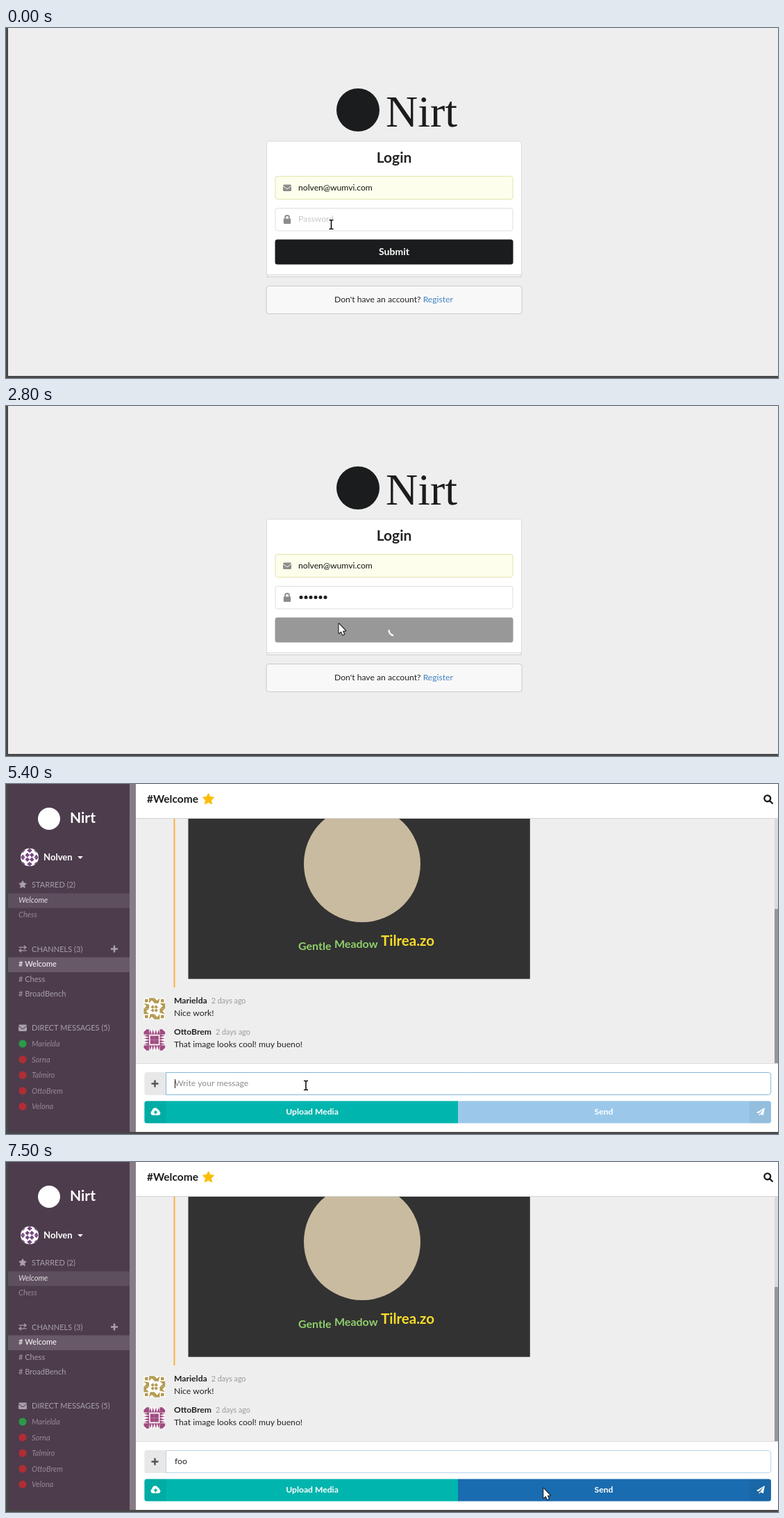
Recreate the animation shown at these times as an HTML page with a canvas. Size 1112 by 504 pixels, loop 8000 ms.

```html
<!DOCTYPE html>
<html lang="en">
<head>
<meta charset="utf-8">
<title>Chat login</title>
<style>
  html, body { margin: 0; width: 100%; height: 100%; overflow: hidden; background: #eee; }
  canvas { display: block; }
</style>
</head>
<body>
<canvas id="stage" width="1112" height="504"></canvas>
<script>
const ctx = document.getElementById('stage').getContext('2d');
const LOOP = 8000, BASE = 12.16, SIDE = 11.05;
const INK = '#1b1c1d', FOCUS = '#85b7d9', LINE = '#dededf', HINT = '#c7c7c7', HINT_ON = '#8c8c8c';

// ---- drawing helpers ----
function rect(x, y, w, h, fill) {
  ctx.fillStyle = fill;
  ctx.fillRect(x, y, w, h);
}

function box(x, y, w, h, fill, stroke, radius = 3.5) {
  ctx.beginPath();
  ctx.roundRect(x, y, w, h, radius);
  ctx.fillStyle = fill;
  ctx.fill();
  if (stroke) {
    ctx.strokeStyle = stroke;
    ctx.lineWidth = 1;
    ctx.stroke();
  }
}

function disc(x, y, r, fill) {
  ctx.beginPath();
  ctx.arc(x, y, r, 0, 2 * Math.PI);
  ctx.fillStyle = fill;
  ctx.fill();
}

// Draws text and returns its width
function text(s, x, y, size, color, style = '', align = 'left', family = 'Lato, sans-serif') {
  ctx.font = `${style} ${size}px ${family}`;
  ctx.textAlign = align;
  ctx.fillStyle = color;
  ctx.fillText(s, x, y);
  return ctx.measureText(s).width;
}

function shape(x, y, d, fill, stroke, width = 1) {
  const path = new Path2D(d);
  ctx.save();
  ctx.translate(x, y);
  ctx.lineJoin = 'round';
  if (stroke) {
    ctx.strokeStyle = stroke;
    ctx.lineWidth = width;
    ctx.stroke(path);
  }
  if (fill) {
    ctx.fillStyle = fill;
    ctx.fill(path);
  }
  ctx.restore();
}

// ---- icons ----
function star(x, y, r, color) {
  let d = '';
  for (let i = 0; i < 10; i++) {
    const a = i * Math.PI / 5 - Math.PI / 2, k = i % 2 ? r * 0.5 : r;
    d += (i ? 'L' : 'M') + Math.cos(a) * k + ' ' + Math.sin(a) * k;
  }
  shape(x, y, d + 'Z', color, color, 1);
}

function plus(x, y, color) {
  rect(x - 5, y - 1.25, 10, 2.5, color);
  rect(x - 1.25, y - 5, 2.5, 10, color);
}

function mail(x, y, color, back) {
  box(x - 6, y - 4.5, 12, 9.5, color, null, 1.5);
  shape(x, y, 'M-6 -2.5L-1 1.2Q0 1.8 1 1.2L6 -2.5', null, back, 1);
}

function lock(x, y, color) {
  box(x - 5.2, y - 1.5, 10.4, 7.5, color, null, 1.2);
  shape(x, y, 'M-3 -1V-3A3 3 0 0 1 3 -3V-1', null, color, 1.8);
}

function search(x, y) {
  shape(x, y, 'M3.2 -1.2A4.4 4.4 0 1 1 -5.6 -1.2A4.4 4.4 0 1 1 3.2 -1.2M2 2L6.5 6.5', null, INK, 2.4);
}

function cloud(x, y, color) {
  shape(x, y, 'M-4.5 5A3.5 3.5 0 0 1 -5 -1.5A4.3 4.3 0 0 1 3 -3.5A3 3 0 0 1 5.5 -0.5A3 3 0 0 1 4.5 5Z', '#fff');
  shape(x, y, 'M0 -2L3.2 1.3H1V3.6H-1V1.3H-3.2Z', color);
}

function plane(x, y) {
  shape(x, y, 'M6 -6L-6 1L-3 2.4L4 -4L-1 3.2L3.8 5.2ZM-2.2 3V6L-0.3 3.8Z', '#fff');
}

// Four-fold tile portrait: one quarter turned about the centre, in units of a half side
function tiles(cx, cy, half, color, quarter) {
  rect(cx - half, cy - half, 2 * half, 2 * half, '#fff');
  const path = new Path2D(quarter);
  for (let i = 0; i < 4; i++) {
    ctx.save();
    ctx.translate(cx, cy);
    ctx.rotate(i * Math.PI / 2);
    ctx.scale(half / 2, half / 2);
    ctx.fillStyle = color;
    ctx.fill(path);
    ctx.restore();
  }
}

// ---- pointers ----
function ibeam(x, y) {
  const d = 'M-3 -6.5H-1L0 -5.8L1 -6.5H3M0 -5.8V5.8M-3 6.5H-1L0 5.8L1 6.5H3';
  shape(x, y, d, null, '#fff', 3.4);
  shape(x, y, d, null, '#000', 1.5);
}

function arrow(x, y) {
  shape(x, y, 'M0 0V13.8L3.2 11L5.4 16L7.6 15L5.5 10.2H9.6Z', '#fff', '#111', 2);
}

// Latest entry [time, ...values] that has started
function at(list, t) {
  return list.filter(e => e[0] <= t).pop().slice(1);
}

const POINTER = [
  [0, ibeam, 468.5, 283], [1800, ibeam, 470, 288], [1900, arrow, 473, 310],
  [2000, arrow, 476, 345], [2100, arrow, 478, 378], [2200, arrow, 479, 364],
  [2300, arrow, 479, 336], [2400, arrow, 479, 319], [2500, arrow, 479.5, 313.5],
  [4100, ibeam, 435.5, 433], [4500, ibeam, 432, 434],
  [6800, ibeam, 739.5, 433], [7100, arrow, 774.3, 470]
];
const DOTS = [[0, 0], [800, 2], [1000, 3], [1100, 4], [1400, 5], [1600, 6]];
const TYPED = [[0, ''], [5800, 'fo'], [6200, 'foo']];

// ---- screens ----
function spinner(t) {
  const step = Math.min(2800, Math.floor(t / 100) * 100);
  const mid = (140 + (step - 2800) * 0.6) * Math.PI / 180;
  ctx.beginPath();
  ctx.arc(559.5, 322.5, 8, mid - 0.7, mid + 0.7);
  ctx.strokeStyle = '#fff';
  ctx.lineWidth = 2.3;
  ctx.stroke();
}

function login(t) {
  const focus = t >= 600 && t < 2600, loading = t >= 2600;
  const [dots] = at(DOTS, t);
  rect(3, 0, 1109, 501, '#eee');

  disc(507, 118, 31, INK);
  text('Nirt', 547, 142, 64, INK, '', 'left', '"Liberation Serif", serif');

  box(375.5, 357, 367, 2, '#d0d0d1', null, 1);
  box(375.5, 163, 367, 195, '#fff', '#d9d9da', 3);
  rect(376, 355, 366, 1, '#d4d4d5');
  text('Login', 559, 194, 21, '#212223', 'bold', 'center');

  box(388, 213.5, 342, 33, '#fdffec', '#e4e2ad');
  mail(405, 230, '#8c8c8c', '#fdffec');
  text('nolven@wumvi.com', 421, 234, BASE, '#111');

  box(388, 259.5, 342, 32.5, '#fff', focus ? FOCUS : LINE);
  lock(405, 276, focus ? INK : '#8c8c8c');
  if (!dots) text('Password', 421, 279, BASE, focus ? HINT_ON : HINT);
  for (let i = 0; i < dots; i++) disc(425 + i * 7, 275.5, 2.5, INK);
  if (focus) rect(421 + Math.round(dots * 7.1), 269, 1, 13, INK);

  box(387.5, 304.5, 343, 36, loading ? '#989898' : INK);
  if (loading) spinner(t);
  else text('Submit', 559, 327, 14, '#fff', 'bold', 'center');

  box(375, 371.5, 368, 40, '#f8f8f8', '#c9cacb');
  const w = text("Don't have an account? ", 473, 394.5, BASE, '#222');
  text('Register', 473 + w, 394.5, BASE, '#4183c4');
}

function sidebar() {
  const DIM = '#a9a0a9', FAINT = '#958a95';
  rect(3, 0, 175, 501, '#4c3c4c');
  rect(178, 0, 9, 501, '#887b88');
  disc(62, 50, 16, '#fff');
  text('Nirt', 92, 56, 21, '#fff', 'bold');

  ctx.save();
  ctx.beginPath();
  ctx.arc(34, 105.5, 13, 0, 2 * Math.PI);
  ctx.clip();
  tiles(34, 105.5, 13, '#75477f', 'M.5 0L1 .5L.5 1L0 .5ZM1 0L2 0L1.5 .6ZM0 1L.6 1.5L0 2ZM1.5 1L2 1.5L1.5 2L1 1.5Z');
  ctx.restore();
  text('Nolven', 54, 109.5, 13.1, '#fff', 'bold');
  shape(107, 106, 'M-3.8 -2H3.8L0 2Z', '#fff');

  rect(3, 157.5, 175, 21, '#5e4f5e');
  rect(3, 249.5, 175, 21.5, '#685968');

  star(24, 145, 5.5, DIM);
  text('STARRED (2)', 37, 149, SIDE, DIM);
  text('Welcome', 18, 171, SIDE, '#e0dce0', 'italic');
  text('Chess', 18, 192, SIDE, FAINT, 'italic');

  shape(24, 237.5, 'M-5.5 -2.3H4M2 -4.8L5 -2.3L2 .2M5.5 2.3H-4M-2 -.2L-5 2.3L-2 4.8', null, DIM, 1.3);
  text('CHANNELS (3)', 37, 241.5, SIDE, DIM);
  plus(156, 237.5, DIM);
  ['Welcome', 'Chess', 'BroadBench'].forEach((name, i) =>
    text('# ' + name, 18, 263 + i * 21.5, SIDE, i ? DIM : '#fff'));

  mail(24, 351, DIM, '#4c3c4c');
  text('DIRECT MESSAGES (5)', 37, 355, SIDE, DIM);
  ['Marielda', 'Sorna', 'Talmiro', 'OttoBrem', 'Velona'].forEach((name, i) => {
    const y = 374 + i * 22.6;
    disc(24, y, 5.6, i ? '#b02d35' : '#2b9a48');
    text(name, 37, y + 4, SIDE, FAINT, 'italic');
  });
}

function comment(name, body, y) {
  const w = text(name, 242, y, BASE, '#222', 'bold');
  text('2 days ago', 242 + w + 6, y, 10.7, '#9a9a9a');
  text(body, 242, y + 17.8, BASE, '#222');
}

function messages(t) {
  rect(187, 50, 925, 352, '#eee');
  rect(1107, 50, 5, 352, '#dadada');
  if (t < 4500) return;
  rect(1107, 180, 5, 222, '#969696');
  rect(241.6, 50, 1.8, 243, '#f9ab2e');
  rect(262.5, 50, 492.3, 230.7, '#323232');
  disc(513, 115, 84, '#c9bba0');
  text('Gentle', 421, 239, 16, '#8fd06c', 'bold');
  text('Meadow', 473, 236, 16, '#8fd06c', 'bold');
  text('Tilrea.zo', 540, 233, 20.5, '#f8dc2a', 'bold');

  comment('Marielda', 'Nice work!', 316);
  comment('OttoBrem', 'That image looks cool! muy bueno!', 361.3);
  if (t < 5100) return;
  tiles(213.8, 323.5, 15.3, '#b39a50',
    'M0 .3L.3 0L.7 .3L.3 .7ZM1 0L2 0L1.5 .5L2 1L1 .8ZM0 1L.5 1.6L1 1L1 2L0 2ZM1.2 1.2L1.8 1.2L1.8 1.8L1.2 1.8Z');
  tiles(213.8, 368.5, 15.3, '#a04c80',
    'M0 0L.8 0L.8 .8L0 .8ZM1 0L2 .3L1 .5L2 .8L1 1ZM0 1L.3 2L.5 1L.8 2L1 1ZM1 1L2 1L2 1.5L1.5 2L1 2Z');
}

function header() {
  rect(187, 0, 925, 49, '#fff');
  rect(187, 49, 925, 1, '#d4d4d5');
  text('#Welcome', 203, 27, 15.5, INK, 'bold');
  star(291.5, 22, 8.5, '#fbbd08');
  search(1098, 22);
}

function composer(t) {
  const focus = t >= 5400, [typed] = at(TYPED, t);
  const blue = t >= 7500 ? '#1a6cb0' : t >= 7100 ? '#1678c2' : t >= 5800 ? '#2185d0' : '#9bc8ea';
  const caret = focus && t < 7500 && !(t >= 6500 && t < 7100);
  const left = [3.5, 0, 0, 3.5], right = [0, 3.5, 3.5, 0], top = 456.6, high = 31.8;
  rect(187, 402, 925, 99, '#fff');
  rect(187, 402, 925, 1, '#dcdcdd');

  box(199.4, 415, 31, 33, '#e8e8e8', null, left);
  plus(214.5, 431.5, '#555');
  box(230.5, 415.5, 871.2, 32, '#fff', t >= 7500 ? '#b5d2e5' : focus ? FOCUS : LINE, right);
  let w = 0;
  if (typed) w = text(typed, 243, 435, BASE, '#222');
  else text('Write your message', 243, 435, BASE, focus ? HINT_ON : HINT);
  if (caret) rect(Math.round(243 + w), 425, 1, 13, INK);

  box(199.4, top, 451.6, high, '#00b5ad', null, left);
  box(199.4, top, 31.4, high, 'rgba(0,0,0,.05)', null, left);
  cloud(215.5, 472, '#00aca4');
  text('Upload Media', 441, 476, BASE, '#fff', 'bold', 'center');
  box(651, top, 451, high, blue, null, right);
  box(1071, top, 31, high, 'rgba(0,0,0,.05)', null, right);
  text('Send', 861, 476, BASE, '#fff', 'bold', 'center');
  plane(1087, 472);
}

function chat(t) {
  sidebar();
  messages(t);
  header();
  composer(t);
}

function frame() {
  const t = performance.now() % LOOP;
  rect(0, 0, 1112, 504, '#484848');
  if (t < 4100) login(t);
  else chat(t);
  const [draw, x, y] = at(POINTER, t);
  draw(x, y);
  requestAnimationFrame(frame);
}
frame();
</script>
</body>
</html>
```
